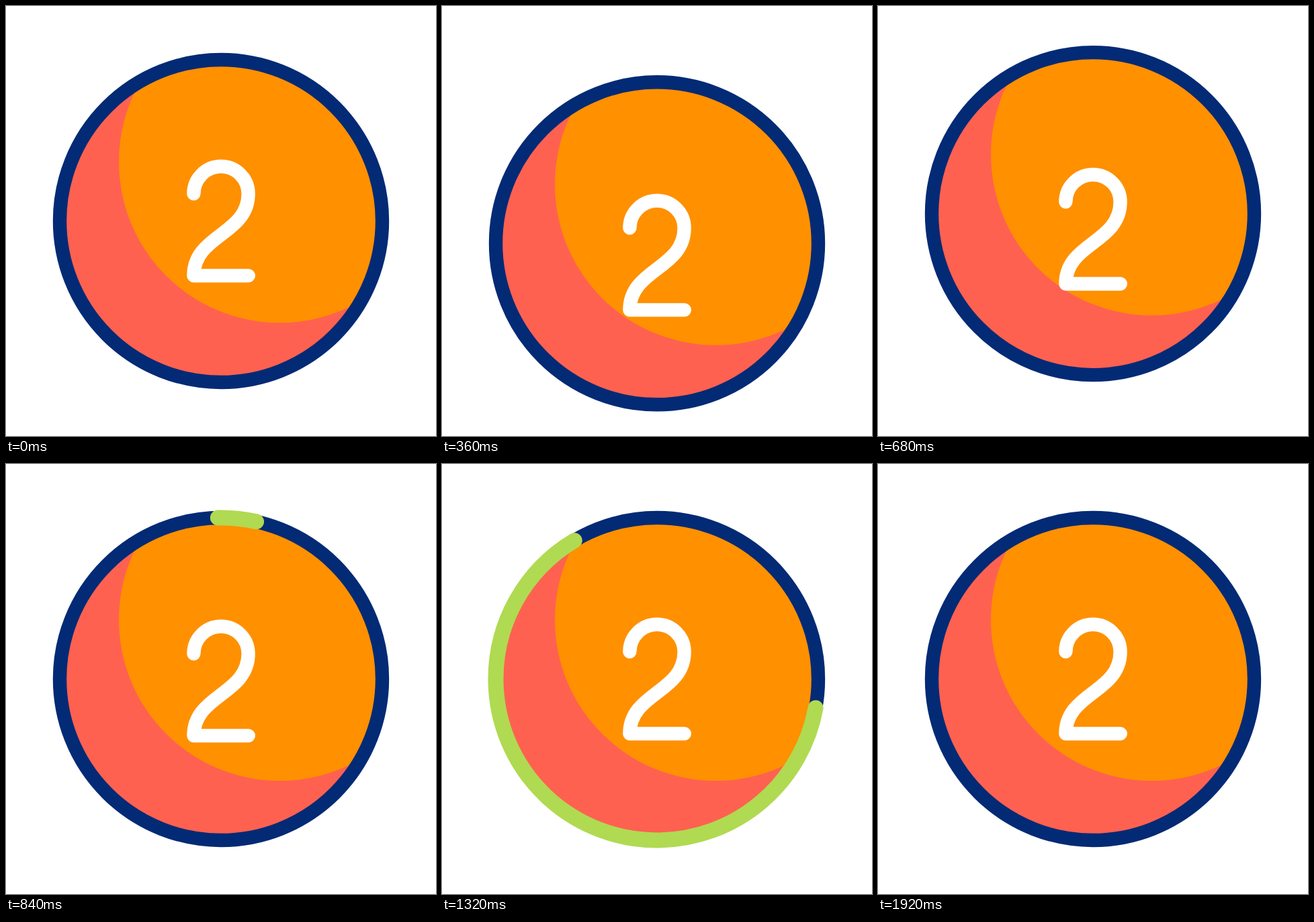
These frames come from a looping animation (640 by 640 pixels, 2000 ms). An HTML page:

```html
<!DOCTYPE html>
<html lang="en">
<head>
<meta charset="utf-8">
<title>Bouncing number badge</title>
<style>
  html, body { margin: 0; width: 100%; height: 100%; overflow: hidden; background: #fff; }
  svg { display: block; width: 100vw; height: 100vh; }
</style>
</head>
<body>
<svg viewBox="0 0 640 640" fill="none" stroke-linecap="round" stroke-linejoin="round">
  <clipPath id="disc"><circle cx="320" cy="320" r="240"/></clipPath>
  <g id="ball">
    <circle cx="320" cy="320" r="240" fill="#ff6150"/>
    <g clip-path="url(#disc)"><circle cx="407.5" cy="232" r="239.5" fill="#ff9000"/></g>
    <circle cx="320" cy="320" r="240" stroke="#032a75" stroke-width="20.4"/>
  </g>
  <path id="digit" stroke="#fff" stroke-width="20.4"
    d="M279.4 279.4A40.6 40.6 0 0 1 360.6 279.4C360.6 340.4 279.4 340.4 279.4 401.4H360.8"/>
  <circle id="sweep" cx="320" cy="320" r="240" pathLength="1" stroke="#b0da51"
    stroke-width="23" transform="rotate(-91.1 320 320)"/>
</svg>
<script>
  const LOOP = 2000, STEP = 40;
  const [ball, digit, sweep] = ['ball', 'digit', 'sweep'].map(id => document.getElementById(id));

  // Keys are [time in ms, value].
  const ballKeys = [[140, 0], [360, 33.3], [560, -31], [760, 0]];
  const digitKeys = [[140, 0], [360, 51], [560, -63], [760, 53], [1000, -140], [1240, 0]];
  const headKeys = [[760, 0], [1440, 1]];
  const tailKeys = [[1082, 0], [1762, 1]];

  const ease = x => x * x * (3 - 2 * x);

  function valueAt(keys, t) {
    if (t <= keys[0][0]) return keys[0][1];
    for (let i = 1; i < keys.length; i++) {
      const [t0, a] = keys[i - 1], [t1, b] = keys[i];
      if (t < t1) return a + (b - a) * ease((t - t0) / (t1 - t0));
    }
    return keys[keys.length - 1][1];
  }

  function shift(part, y) {
    part.setAttribute('transform', `translate(0 ${y})`);
  }

  function draw(t) {
    shift(ball, valueAt(ballKeys, t));
    shift(digit, valueAt(digitKeys, t));
    const head = valueAt(headKeys, t), tail = valueAt(tailKeys, t);
    sweep.setAttribute('visibility', head > tail ? 'visible' : 'hidden');
    sweep.setAttribute('stroke-dasharray', `${head - tail} 2`);
    sweep.setAttribute('stroke-dashoffset', -tail);
  }

  const start = performance.now();
  function tick() {
    const t = (performance.now() - start) % LOOP;
    draw(Math.floor(t / STEP) * STEP);
    requestAnimationFrame(tick);
  }
  draw(0);
  requestAnimationFrame(tick);
</script>
</body>
</html>
```
